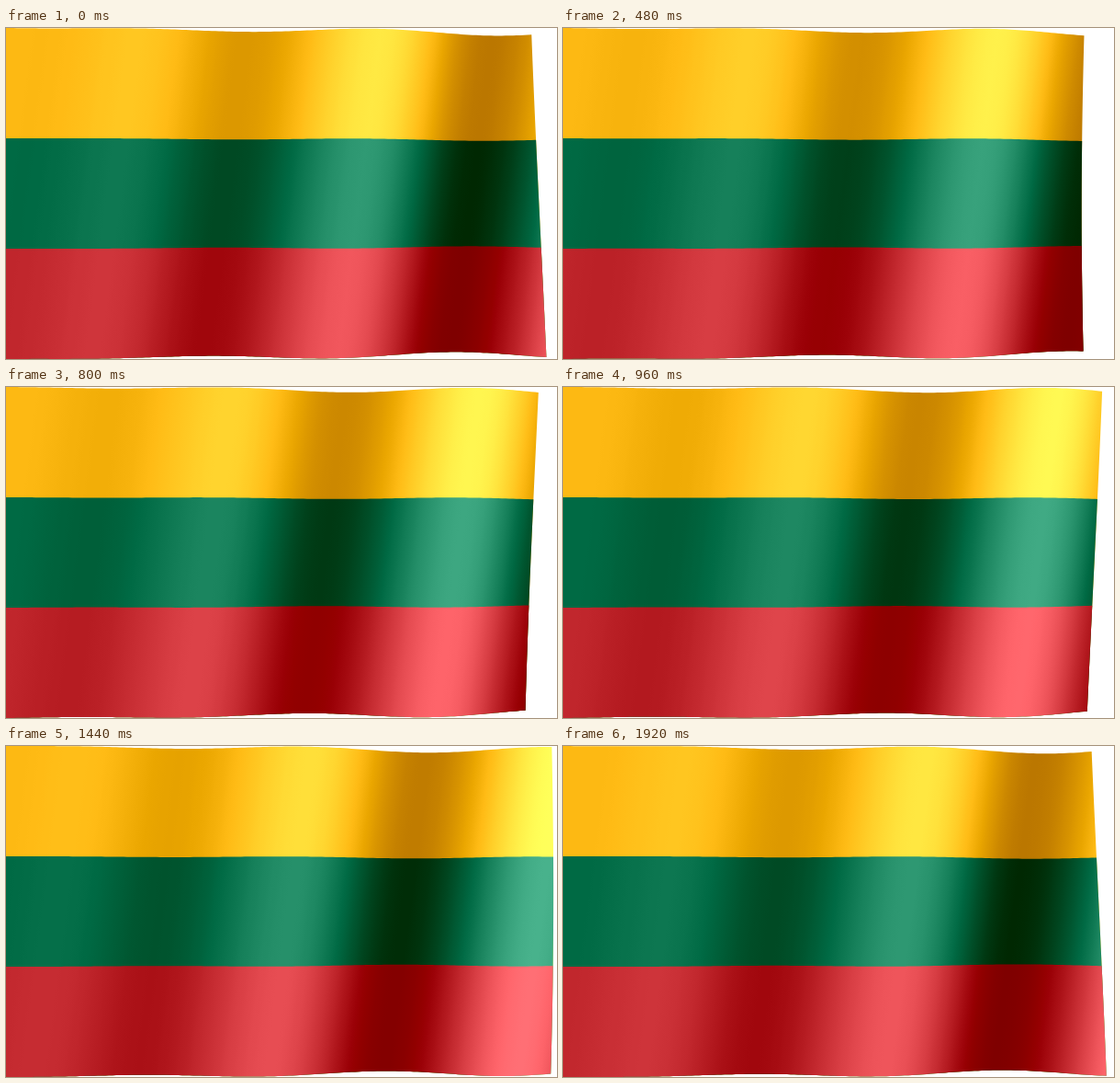
Write an HTML page with a canvas that moves like this. It is 600 by 360 pixels and loops after 2000 ms.

```html
<!DOCTYPE html>
<html lang="en">
<head>
<meta charset="utf-8">
<title>Waving flag</title>
<style>
  html, body { margin: 0; width: 100%; height: 100%; overflow: hidden; background: #fff; }
  canvas { display: block; width: 600px; height: 360px; }
</style>
</head>
<body>
<canvas id="flag" width="600" height="360"></canvas>
<script>
const W = 600, H = 360, LOOP = 2000, STEP = 80;
const WAVE = 275;    // distance between folds
const LEAN = 47.4;   // how far a fold leans from top to bottom
const FOLD = 230;    // first dark fold at mid height, at time 0
const CREST = 0.55;  // place of the highlight between two folds
const BANDS = [[253, 185, 19], [0, 106, 68], [193, 39, 45]];
const ctx = document.getElementById('flag').getContext('2d');
const TAU = 2 * Math.PI;

const foldAt = t => FOLD + WAVE * t / LOOP;

// Brightness added to the cloth at distance q along the wave
function shade(q, t) {
  const turns = (q - foldAt(t)) / WAVE;
  const u = turns - Math.floor(turns);
  const w = u < CREST
    ? -Math.cos(Math.PI * u / CREST)
    : Math.cos(Math.PI * (u - CREST) / (1 - CREST));
  const x = Math.max(q, 0);
  return w * (w > 0 ? 0.124 * x : Math.min(0.142 * x, 66));
}

function bandFill(rgb, t) {
  const k = LEAN / H, n = 1 + k * k, from = -40, to = 640, stops = 136;
  const at = q => [q / n, H / 2 + q * k / n];
  const fill = ctx.createLinearGradient(...at(from), ...at(to));
  for (let i = 0; i <= stops; i++) {
    const s = shade(from + (to - from) * i / stops, t);
    const c = rgb.map(v => Math.round(Math.min(255, Math.max(0, v + s))));
    fill.addColorStop(i / stops, `rgb(${c})`);
  }
  return fill;
}

// Free edge of the cloth at height v (0 top, 1 bottom)
function edgeX(v, t) {
  return 580.5 - (15 + 1.5 * v) * Math.cos(TAU * (t - 315 - 345 * v) / LOOP);
}

// Folds lie further back, so the cloth looks less tall there
function lineY(x, v, t) {
  const phase = TAU * (x + LEAN * (v - 0.5) - foldAt(t)) / WAVE;
  return H * v + (1 - 2 * v) * x / 570 * (5 + 4 * Math.cos(phase));
}

function drawFrom(v, fill, t) {
  ctx.beginPath();
  ctx.moveTo(0, H * v);
  for (let x = 4, end = edgeX(v, t); x < end; x += 4) ctx.lineTo(x, lineY(x, v, t));
  for (let i = 0; i <= 24; i++) {
    const h = v + (1 - v) * i / 24, x = edgeX(h, t);
    ctx.lineTo(x, lineY(x, h, t));
  }
  for (let x = Math.floor(edgeX(1, t) / 4) * 4; x >= 0; x -= 4) ctx.lineTo(x, lineY(x, 1, t));
  ctx.closePath();
  ctx.fillStyle = fill;
  ctx.fill();
}

function draw(t) {
  ctx.fillStyle = '#fff';
  ctx.fillRect(0, 0, W, H);
  BANDS.forEach((rgb, i) => drawFrom(i / 3, bandFill(rgb, t), t));
}

let start = null, shown = -1;
function tick(now) {
  if (start === null) start = now;
  const t = Math.floor((now - start) % LOOP / STEP) * STEP;
  if (t !== shown) draw(shown = t);
  requestAnimationFrame(tick);
}
draw(0);
requestAnimationFrame(tick);
</script>
</body>
</html>
```
